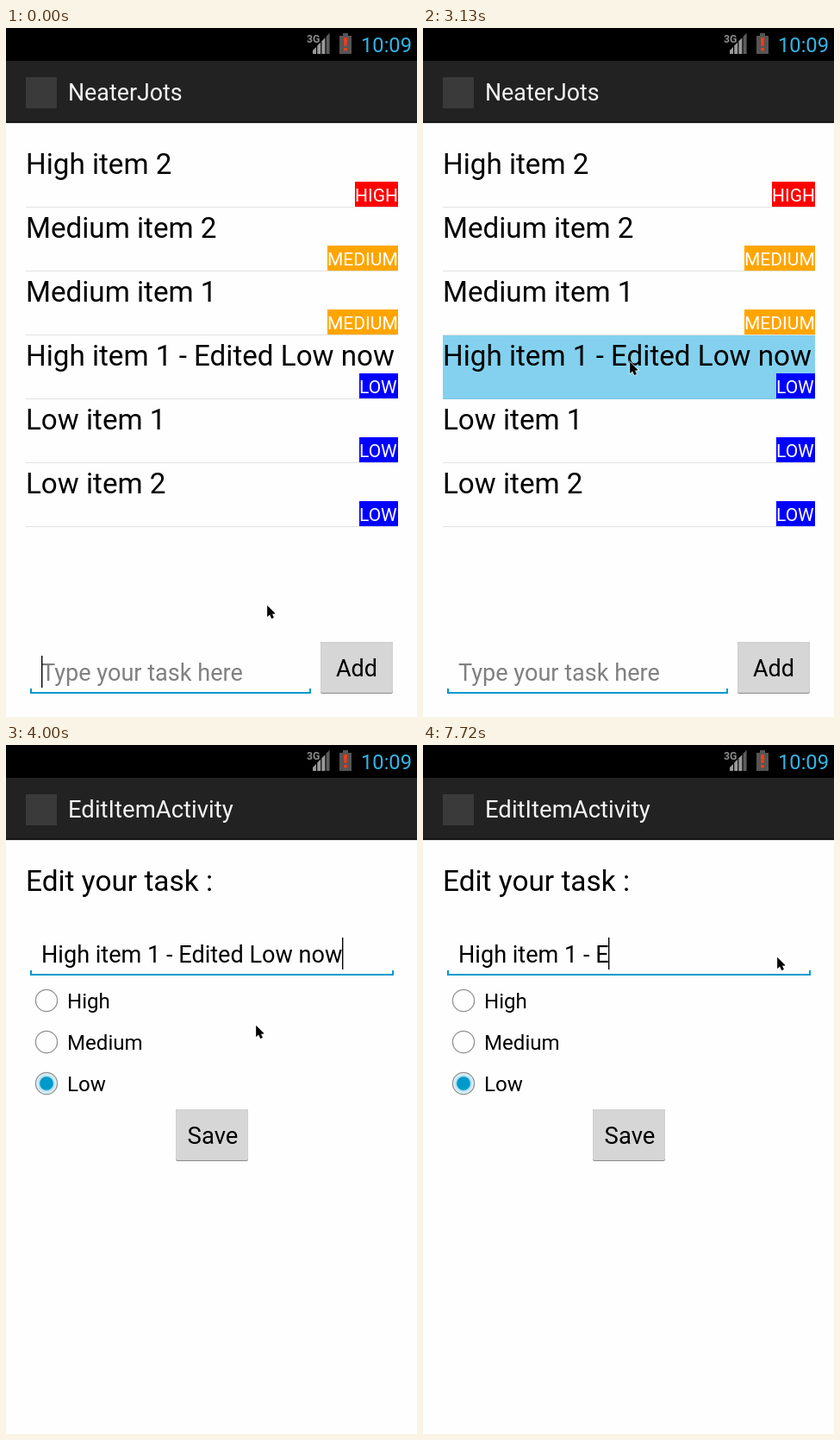
These frames come from a looping animation (477 px wide and 798 px high, 8000 ms). An HTML page with a canvas:

```html
<!DOCTYPE html>
<html lang="en">
<head>
<meta charset="utf-8">
<title>Todo list</title>
<style>
  html, body { margin: 0; width: 100%; height: 100%; overflow: hidden; background: #fefefe; }
  canvas { display: block; width: 477px; height: 798px; }
</style>
</head>
<body>
<canvas id="stage" width="477" height="798"></canvas>
<script>
const W = 477, H = 798, LOOP = 8000, PIVOT = 409;
const PAGE = '#fefefe', BLUE = '#0099cc', HOLO = '#33b5e5';
const stage = document.getElementById('stage').getContext('2d');
const layer = document.createElement('canvas');
layer.width = W;
layer.height = H;
const layerCtx = layer.getContext('2d');

const TASK = 'High item 1 - Edited Low now';
const items = [
  ['High item 2', 'HIGH'], ['Medium item 2', 'MEDIUM'], ['Medium item 1', 'MEDIUM'],
  [TASK, 'LOW'], ['Low item 1', 'LOW'], ['Low item 2', 'LOW']
];
const badges = { HIGH: ['#ff0000', 405], MEDIUM: ['#ffa500', 373], LOW: ['#0000ff', 410] };
const deletions = [5820, 5970, 6090, 6240, 6390, 6570, 6720, 6880, 7030, 7190, 7340, 7520, 7720];

// Pointer stops: time, x, y
const pointerPath = [
  [0, 303, 669], [20, 303, 670], [460, 300, 690], [1290, 300, 690], [1450, 318, 680],
  [1700, 308, 500], [1950, 246, 345], [2070, 250, 391], [2230, 240, 387], [3660, 240, 387],
  [3790, 286, 380], [4000, 290, 325], [4450, 411, 251], [4760, 412, 248], [4930, 411, 246], [LOOP, 411, 246]
];

const clamp01 = v => Math.max(0, Math.min(1, v));
const ramp = (t, a, b) => clamp01((t - a) / (b - a));
const within = (t, ...spans) => spans.some(([a, b]) => t >= a && t < b);

function rect(c, color, x, y, w, h) {
  c.fillStyle = color;
  c.fillRect(x, y, w, h);
}

function text(c, str, x, y, size, color = '#000', align = 'left', weight = 400) {
  c.font = `${weight} ${size}px Roboto, sans-serif`;
  c.textAlign = align;
  c.fillStyle = color;
  c.fillText(str, x, y);
}

function polygon(c, points, color) {
  c.beginPath();
  points.forEach(([x, y]) => c.lineTo(x, y));
  c.closePath();
  c.fillStyle = color;
  c.fill();
}

function circle(c, x, y, r, fill, stroke) {
  c.beginPath();
  c.arc(x, y, r, 0, Math.PI * 2);
  c.fillStyle = fill;
  c.fill();
  if (stroke) {
    c.strokeStyle = stroke;
    c.lineWidth = 1.3;
    c.stroke();
  }
}

function statusBar(c) {
  rect(c, '#000', 0, 0, W, 38);
  text(c, '3G', 349, 17, 12.3, '#8c8c8c', 'left', 700);
  for (let i = 0; i < 4; i++) {
    const x = 356 + i * 5.2, top = 26 - i * 5.4;
    polygon(c, [[x, top], [x + 4, top - 4], [x + 4, 30], [x, 30]], i < 3 ? '#999' : '#5c5c5c');
  }
  rect(c, '#555', 391, 6, 6, 3);
  rect(c, '#555', 387, 9, 14, 21);
  polygon(c, [[392, 11], [396, 11], [395.4, 21], [392.6, 21]], '#ff3a14');
  rect(c, '#ff3a14', 392.3, 23, 3.4, 3.4);
  text(c, '10:09', 412, 28, 23.7, HOLO);
}

function actionBar(c, title, size) {
  rect(c, '#222', 0, 38, W, 72);
  rect(c, '#161616', 0, 108, W, 2);
  rect(c, '#e4e4e4', 0, 110, W, 1);
  rect(c, '#3a3a3a', 23, 57, 36, 36);
  text(c, title, 72, 84, size, '#f3f3f3');
}

function underline(c, right, y, focused) {
  const color = focused ? BLUE : '#a0a0a0';
  const x = focused ? 28 : 29, thick = focused ? 2 : 1;
  const end = focused ? right : right - 1;
  rect(c, color, x, y, end - x, thick);
  rect(c, color, x, y - 4, thick, 5);
  rect(c, color, end - thick, y - 4, thick, 5);
}

function button(c, label, x, y, labelX, size) {
  c.beginPath();
  c.roundRect(x, y, 84, 60, 2);
  c.fillStyle = '#8e8e8e';
  c.fill();
  c.beginPath();
  c.roundRect(x, y, 84, 59, 2);
  c.fillStyle = '#d0d0d0';
  c.fill();
  rect(c, '#d6d6d6', x + 1, y + 1, 82, 57);
  text(c, label, labelX, y + 40, size, '#000', 'center');
}

function radio(c, y, label, checked) {
  circle(c, 47, y, 12.6, PAGE, '#929292');
  if (checked) {
    const glow = c.createRadialGradient(47, y, 7, 47, y, 12);
    glow.addColorStop(0, 'rgba(0,153,204,0.5)');
    glow.addColorStop(0.6, 'rgba(0,153,204,0.18)');
    glow.addColorStop(1, 'rgba(0,153,204,0.12)');
    circle(c, 47, y, 12, glow);
    circle(c, 47, y, 7.8, BLUE);
  }
  text(c, label, 71, y + 9, 24.1);
}

function listScreen(c, t) {
  rect(c, PAGE, 0, 38, W, H - 38);
  actionBar(c, 'NeaterJots', 26.8);
  items.forEach(([name, level], i) => {
    const y = 74 * i, [color, left] = badges[level];
    rect(c, '#e3e3e3', 23, 207 + y, 432, 1);
    if (i === 3 && t >= 3000) {
      c.globalAlpha = 0.6 * (1 - ramp(t, 3200, 3480));
      rect(c, HOLO, 23, 134 + y, 432, 74);
      c.globalAlpha = 1;
    }
    text(c, name, 23, 169 + y, 33.2);
    rect(c, color, left, 178 + y, 455 - left, 29);
    text(c, level, left, 201 + y, 21, '#fff');
  });
  text(c, 'Type your task here', 41, 756, 27.1, '#808080');
  if (within(t, [0, 430], [930, 1430], [1930, 2190])) rect(c, '#000', 41, 727, 1.4, 37);
  underline(c, 354, 769, t < 3480);
  button(c, 'Add', 365, 711, 407, 27);
}

function editScreen(c, t) {
  rect(c, PAGE, 0, 38, W, H - 38);
  actionBar(c, 'EditItemActivity', 27.5);
  text(c, 'Edit your task :', 23, 169, 33.4);

  const removed = deletions.filter(d => t >= d).length;
  const typed = TASK.slice(0, TASK.length - removed);
  text(c, typed, 41, 252, 27.1);
  const caretX = Math.floor(41 + c.measureText(typed).width);
  underline(c, 450, 265, true);
  if (!within(t, [4240, 4740], [5660, 5820])) rect(c, '#000', caretX, 223, 1.4, 37);

  ['High', 'Medium', 'Low'].forEach((label, i) => radio(c, 296 + 48 * i, label, i === 2));
  button(c, 'Save', 197, 422, 240, 27.5);

  // Insertion handle below the caret
  const grip = ramp(t, 5150, 5300) * (1 - ramp(t, 5800, 5900));
  if (grip > 0) {
    c.globalAlpha = 0.8 * grip;
    polygon(c, [[390.5, 264], [410, 284], [410, 322], [371, 322], [371, 284]], HOLO);
    c.globalAlpha = 1;
  }
}

function pointer(c, t) {
  const i = pointerPath.findIndex(stop => stop[0] > t);
  const [t0, x0, y0] = pointerPath[i - 1], [t1, x1, y1] = pointerPath[i];
  const p = ramp(t, t0, t1);
  c.save();
  c.translate(Math.round(x0 + (x1 - x0) * p) + 0.5, Math.round(y0 + (y1 - y0) * p) + 0.5);
  c.beginPath();
  [[0, 0], [0, 12], [2.8, 9.6], [4.9, 14.2], [7, 13.2], [5, 8.9], [8.6, 8.6]].forEach(([x, y]) => c.lineTo(x, y));
  c.closePath();
  c.strokeStyle = 'rgba(255,255,255,0.8)';
  c.lineWidth = 2;
  c.stroke();
  c.fillStyle = c.strokeStyle = '#000';
  c.lineWidth = 0.7;
  c.fill();
  c.stroke();
  c.restore();
}

function draw(t) {
  const open = 1 - (1 - ramp(t, 3740, 3990)) ** 2;
  if (open < 1) {
    listScreen(stage, t);
    if (open > 0) {
      rect(stage, `rgba(0,0,0,${0.08 * open})`, 0, 38, W, H - 38);
      layerCtx.clearRect(0, 0, W, H);
      editScreen(layerCtx, t);
      const scale = 0.8 + 0.2 * open;
      stage.save();
      stage.globalAlpha = open * 0.85 + 0.15 * open ** 3;
      stage.translate(W / 2, PIVOT);
      stage.scale(scale, scale);
      stage.drawImage(layer, -W / 2, -PIVOT);
      stage.restore();
    }
  } else {
    editScreen(stage, t);
  }
  statusBar(stage);
  pointer(stage, t);
}

const start = performance.now();
function tick() {
  draw((performance.now() - start) % LOOP);
  requestAnimationFrame(tick);
}
tick();
</script>
</body>
</html>
```
